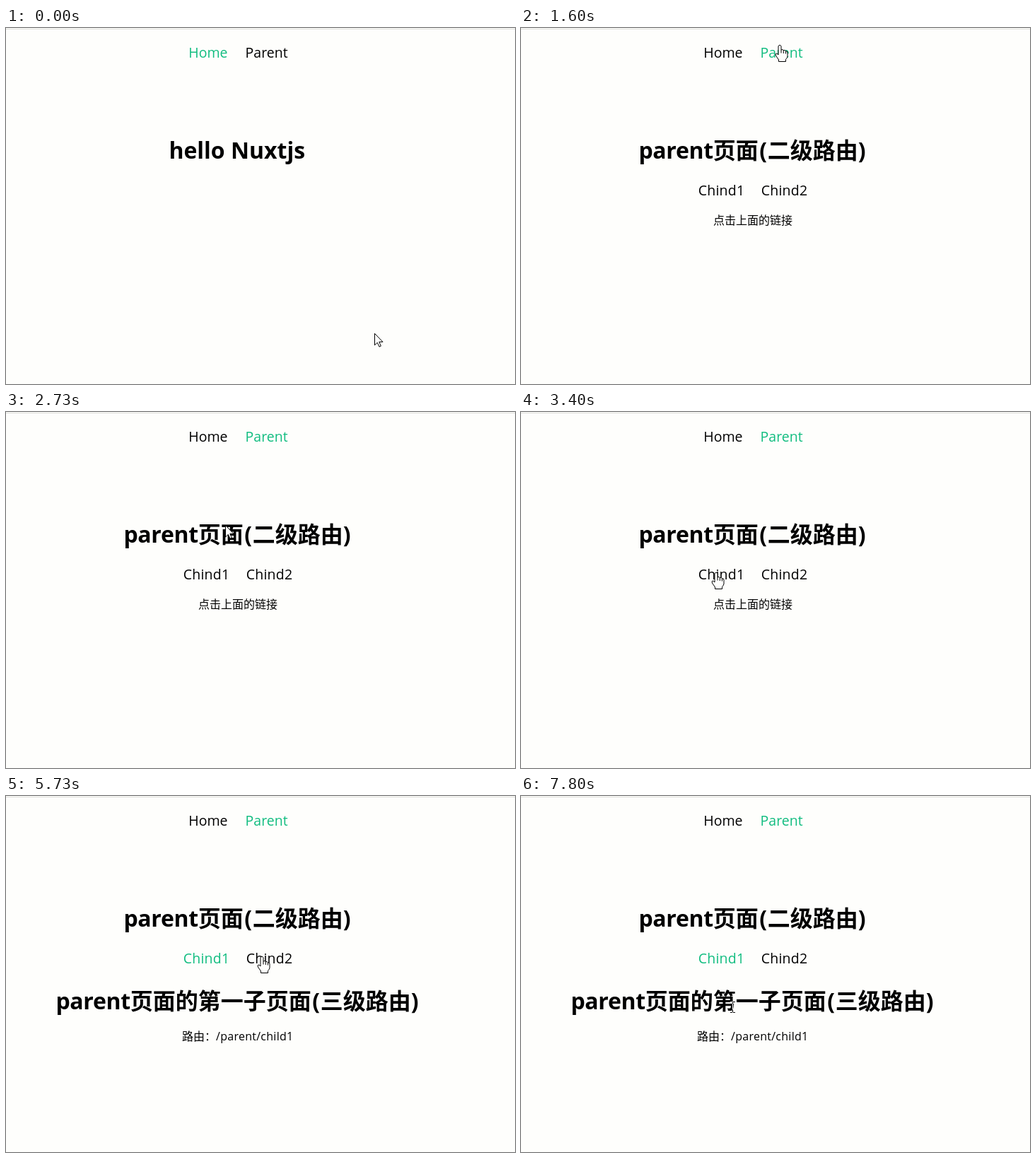
An HTML page that plays this animation: 720 px wide and 504 px high, repeating every 8 s.

```html
<!DOCTYPE html>
<html lang="zh-CN">
<head>
<meta charset="utf-8">
<title>Nested routes</title>
<style>
  html, body { margin: 0; width: 100%; height: 100%; overflow: hidden; background: #fefefc; }
  svg { display: block; width: 720px; height: 504px; }
  text { font: 16px "Open Sans", "Noto Sans CJK SC", "Noto Sans CJK", sans-serif; fill: #000; white-space: pre; }
  .link { font-size: 19.5px; }
  .child { letter-spacing: .2px; }
  .title { font-size: 32px; font-weight: 700; letter-spacing: -.3px; }
  .cjk { letter-spacing: 0; }
  .active { fill: #12bd80; }
  .path { letter-spacing: .28px; }
  .pointer path { fill: #fefefc; stroke: #000; stroke-width: 1; stroke-linejoin: round; }
  #beam { mix-blend-mode: difference; }
  #beam path { fill: none; stroke: #fff; stroke-width: 1; }
</style>
</head>
<body>
<svg viewBox="0 0 720 504">
  <rect width="720" height="504" fill="#fefefc"/>
  <rect y="1" width="720" height="1" fill="#dededa"/>

  <text class="link" id="home" x="258.3" y="42">Home</text>
  <text class="link" id="parent" x="338.6" y="42">Parent</text>

  <g id="homePage">
    <text class="title cjk" x="230.4" y="185">hello Nuxtjs</text>
  </g>

  <g id="parentPage">
    <g id="parentTitle"></g>
    <text class="link child" id="child1" x="250.8" y="237">Chind1</text>
    <text class="link child" x="339.8" y="237">Chind2</text>
    <text id="hint" x="272" y="278">点击上面的链接</text>
    <g id="childPage">
      <g id="childTitle"></g>
      <text x="249" y="346">路由：</text>
      <text class="path" x="297" y="346">/parent/child1</text>
    </g>
  </g>

  <g id="arrow" class="pointer">
    <path d="M.5 .5V17L4.3 13.4L7 19.3L9.4 18.2L6.8 12.4H12Z"/>
  </g>
  <g id="hand" class="pointer">
    <path d="M-2 14V1.5Q0 -1.5 2 1.5V7Q4 5.5 5.3 7.6Q7.4 6.5 8.4 8.8Q11 8 11 11V16Q11 18 8.5 20.5V23.5H-1.5V21L-5.6 15Q-6.6 11.6 -4.2 12Z"/>
    <path d="M2 7V11.5M5.3 7.6V12M8.4 8.8V12.5"/>
  </g>
  <g id="beam">
    <path d="M-3 -7.5H0M1 -7.5H4M.5 -7V7M-3 7.5H0M1 7.5H4"/>
  </g>
</svg>

<script>
const LOOP = 8000, STEP = 200 / 3;
const el = id => document.getElementById(id);
const show = (id, on) => { el(id).style.display = on ? "" : "none"; };
const mark = (id, on) => el(id).classList.toggle("active", on);

// time, x, y of the pointer's hot spot
const track = [
  [0, 521, 432], [67, 521, 432], [800, 306, 33], [867, 306, 33],
  [1333, 366, 24], [2067, 366, 24], [2200, 372, 36], [2333, 372, 36],
  [3000, 276, 227], [5267, 276, 227], [5733, 362, 227], [6533, 362, 227],
  [6800, 310, 306], [7067, 310, 306], [7400, 314, 292], [7667, 314, 292],
  [7800, 299, 299], [8000, 299, 299]
];
const shapes = [
  [0, "arrow"], [800, "beam"], [1000, "hand"], [2133, "beam"],
  [2467, "arrow"], [2933, "hand"], [6600, "arrow"], [6800, "beam"]
];

// mixed Latin and CJK heading, laid out on 32px cells
function heading(id, x, y, name, level) {
  const cells = x + 105.4;
  const open = cells + name.length * 32;
  const inner = open + 13;
  const parts = [
    ["parent", x], [name, cells, "cjk"], ["(", open + 1.5],
    [level, inner, "cjk"], [")", inner + level.length * 32]
  ];
  el(id).innerHTML = parts
    .map(([s, px, kind = ""]) => `<text class="title ${kind}" x="${px}" y="${y}">${s}</text>`)
    .join("");
}

function pointerAt(t) {
  const i = Math.max(1, track.findIndex(k => k[0] > t));
  const [t0, x0, y0] = track[i - 1], [t1, x1, y1] = track[i];
  const p = (t - t0) / (t1 - t0);
  const e = p * p * (3 - 2 * p);
  return [x0 + (x1 - x0) * e, y0 + (y1 - y0) * e].map(Math.round);
}

function render(time) {
  const t = Math.floor((time % LOOP + 5) / STEP) * STEP % LOOP + .5;
  const onParent = t >= 1600, onChild = t >= 5130;
  show("homePage", !onParent);
  show("parentPage", onParent);
  show("hint", !onChild);
  show("childPage", onChild);
  mark("home", !onParent);
  mark("parent", onParent);
  mark("child1", onChild);

  const shape = shapes.filter(s => s[0] <= t).pop()[1];
  const [x, y] = pointerAt(t);
  for (const id of ["arrow", "hand", "beam"]) show(id, id === shape);
  el(shape).setAttribute("transform", `translate(${x} ${y})`);
}

heading("parentTitle", 166.4, 185, "页面", "二级路由");
heading("childTitle", 70.4, 302, "页面的第一子页面", "三级路由");

const start = performance.now();
function tick() {
  render(performance.now() - start);
  requestAnimationFrame(tick);
}
tick();
</script>
</body>
</html>
```
